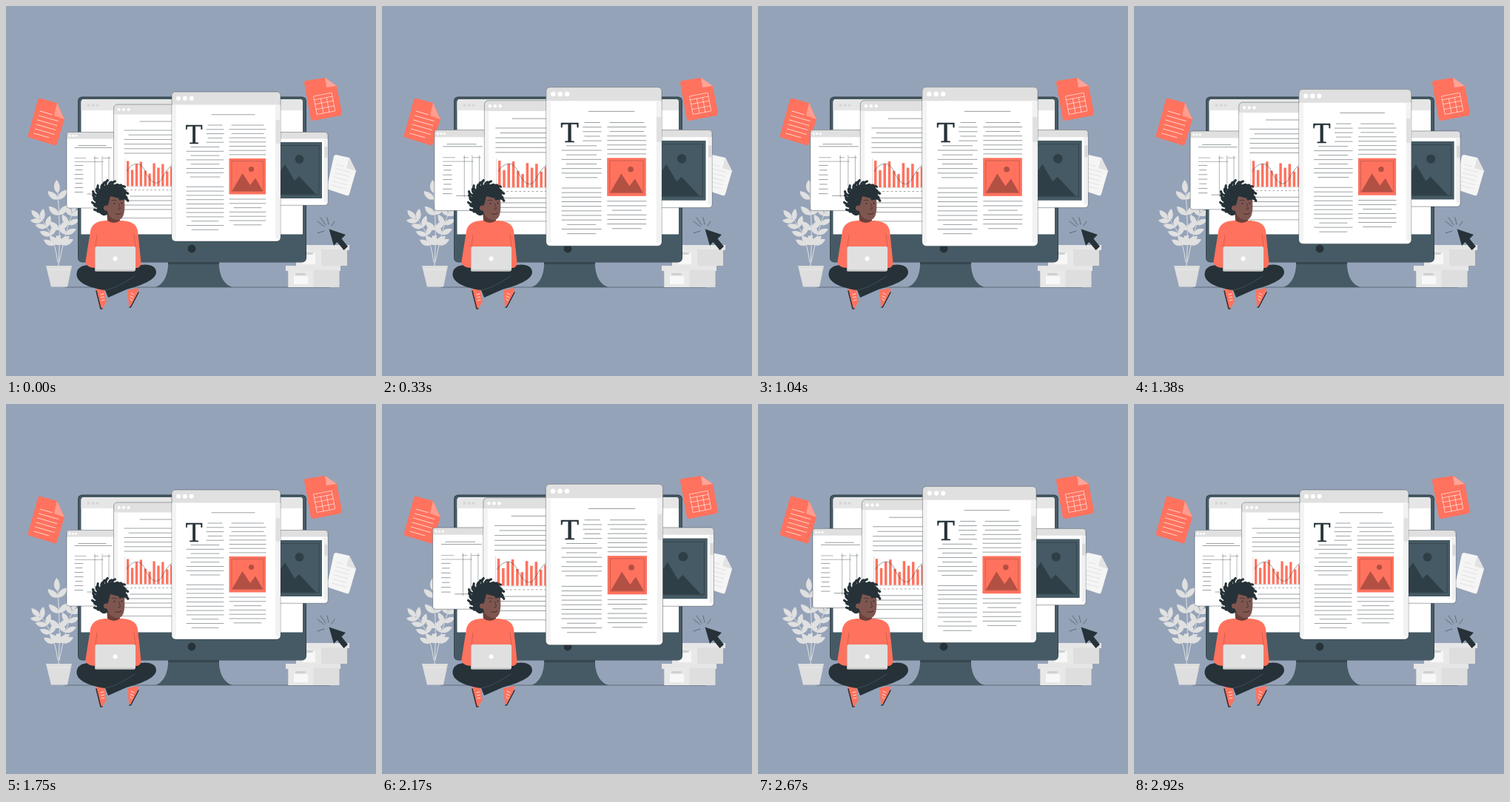
An HTML page that plays this animation: 500x500 px, repeating every 2.96 s.

```html
<!DOCTYPE html>
<html lang="en">
<head>
<meta charset="utf-8">
<title>Documents</title>
<style>
html, body { margin: 0; width: 100%; height: 100%; overflow: hidden; background: #95a3b9; }
svg { display: block; width: 100vw; height: 100vh; }
</style>
</head>
<body>
<svg id="stage" viewBox="0 0 500 500"></svg>
<script>
const INK = '#263238', SLATE = '#455a64', CORAL = '#ff725e', GREY = '#e0e0e0', SKIN = '#7f564f';

const path = (d, fill, extra = '') => `<path d="${d}" fill="${fill}" ${extra}/>`;
const stroke = (d, color = INK, width = 0.6) =>
  path(d, 'none', `stroke="${color}" stroke-width="${width}" stroke-linecap="round" stroke-linejoin="round"`);
const rect = (x, y, w, h, fill, r = 0, extra = '') =>
  `<rect x="${x}" y="${y}" width="${w}" height="${h}" rx="${r}" fill="${fill}" ${extra}/>`;
const circle = (x, y, r, fill) => `<circle cx="${x}" cy="${y}" r="${r}" fill="${fill}"/>`;
const range = (n, fn) => Array.from({ length: n }, (_, i) => fn(i)).join('');
const dots = (x, y, r, gap, fill = '#fff') => range(3, i => circle(x + i * gap, y, r, fill));

// Evenly spaced horizontal rules; "short" lists the inset rows.
const rules = (x1, x2, y, step, n, short = [], inset = 6) => stroke(range(n, i => {
  const d = short.includes(i) ? inset : 0;
  return `M${x1 + d} ${(y + i * step).toFixed(1)}H${x2 - d}`;
}), INK, 0.45);

function panel(x, y, w, h, bar, r) {
  return rect(x, y, w, h, '#fff', r) +
    path(`M${x} ${y + bar}V${y + r}q0 ${-r} ${r} ${-r}H${x + w - r}q${r} 0 ${r} ${r}V${y + bar}z`, GREY) +
    rect(x, y, w, h, 'none', r, `stroke="${INK}" stroke-width=".4"`);
}

function monitor() {
  return path('M219 344H288C287 361 293 376 306 380H202C214 376 220 361 219 344z', SLATE) +
    path('M219 344H288V349H219z', '#37474f') +
    rect(97, 122.5, 309, 224, '#37474f', 6) + rect(98, 124, 307, 222, SLATE, 5) +
    path('M101.5 308.5V130q0-4 4-4H397q4 0 4 4V308.5z', '#fff') +
    path('M101.5 141V130q0-4 4-4H397q4 0 4 4V141z', '#e6e6e6') +
    dots(111.5, 134, 2.1, 6, '#d6d6d6') + circle(251, 328, 5.4, INK);
}

function leaf(x, y, angle, size) {
  return path(`M0 0C${size * .25} ${-size * .34} ${size * .7} ${-size * .32} ${size} 0C${size * .65} ${size * .24} ${size * .25} ${size * .26} 0 0z`,
    GREY, `transform="translate(${x.toFixed(1)} ${y.toFixed(1)}) rotate(${angle.toFixed(1)})"`);
}

// A quadratic stem with leaf pairs along its outer part and one leaf at the tip.
function branch(x0, y0, cx, cy, x1, y1, pairs, size) {
  const at = t => {
    const u = 1 - t;
    return [
      u * u * x0 + 2 * u * t * cx + t * t * x1,
      u * u * y0 + 2 * u * t * cy + t * t * y1,
      Math.atan2(u * (cy - y0) + t * (y1 - cy), u * (cx - x0) + t * (x1 - cx)) * 180 / Math.PI
    ];
  };
  const leaves = range(pairs, i => {
    const [x, y, angle] = at(.3 + .62 * i / (pairs - 1));
    return leaf(x, y, angle - 48, size) + leaf(x, y, angle + 48, size);
  });
  return stroke(`M${x0} ${y0}Q${cx} ${cy} ${x1} ${y1}`, GREY, 1) + leaves + leaf(...at(1), size);
}

function plant() {
  return branch(71, 351, 74, 305, 70, 253, 4, 18) +
    branch(70, 346, 64, 304, 46, 287, 4, 16) +
    branch(72, 346, 80, 306, 90, 279, 4, 16) +
    path('M54 351H89L83 379.5H61z', '#dedede') + stroke('M58 356H85', '#efefef', .8);
}

function flyingPages() {
  const redLines = range(6, i => {
    const x = 46 - i * 1.65, y = 142 + i * 6;
    const w = i === 0 ? 16 : i === 5 ? 20 : 26;
    return `M${x} ${y}l${w} ${w * .29}`;
  });
  const grid = rect(0, 0, 25, 25, 'none', 0, 'stroke="#fff" stroke-width=".55"') +
    stroke('M0 5H25M0 11H25M0 18H25M9 5V25M17 5V25', '#fff', .55);
  return path('M47 125Q44 124 43 127L30 174Q29 177 32 178L65 188Q68 189 69 186L79 153L69 131z', CORAL) +
    path('M69 131L65 148L79 153z', '#ff9c8e') + stroke(redLines, '#fff', .7) +
    path('M405 101L431 97L447 108L454 145Q454 147 452 148L415 155Q412 155 412 153L403 104Q403 101 405 101z', CORAL) +
    path('M431 97L433 110L447 108z', '#ffa497') +
    `<g transform="translate(415.5 122) rotate(-11)">${grid}</g>` +
    path('M446 201L464 205L473 223L464 254Q463 257 460 256L436 248Q433 247 434 244L443 203Q444 201 446 201z', '#f5f5f5') +
    path('M464 205L460 219L473 223z', '#e2e2e2') +
    stroke(range(6, i => `M${447 - i * 1.4} ${214 + i * 5.6}l${i ? 19 : 9} ${i ? 5.2 : 2.5}`), '#dcdcdc', .8);
}

function boxes() {
  return rect(404, 323, 60, 7, '#e6e6e6') + rect(392, 329, 69, 22, '#dedede') +
    rect(392, 329, 34, 22, '#e8e8e8') + rect(400, 334, 18, 15, '#f7f7f7') + rect(403, 333, 12, 3, '#d0d0d0', 1.5) +
    rect(378, 351, 74, 7, '#e6e6e6') + rect(381.5, 357, 69, 23, '#dedede') +
    rect(381.5, 357, 34, 23, '#e8e8e8') + rect(389, 365, 19, 11, '#f8f8f8') + rect(391, 361, 14, 3, '#cfcfcf', 1.5);
}

function pointer() {
  return stroke('M421 291L430 298M425 286L432 296M434 286L436 295M444 291L440 297M421 307L430 304', INK, .5) +
    path('M436.5 301.5L459 309L453.5 314.5L462 325L456.5 330L447.5 319L443 324z', INK);
}

function tablePage() {
  return panel(82, 170.5, 100, 102.5, 9, 3) + dots(86.3, 175.2, 1.5, 4.2) +
    rules(98, 135, 188.5, 3, 1) + rules(93, 143, 191.5, 3, 1) +
    stroke('M93 205.5H108M119 205.5H125M131 205.5H141M93 210.5H131M120 203V256M130 203V256M139 203V256', INK, .35) +
    rules(93, 104, 215.5, 6, 7, [1, 4], 1) + rules(110, 131, 254, 5, 1);
}

function chartPage() {
  const heights = [34, 22, 30, 33, 21, 17, 31, 25, 30, 20, 26];
  return panel(145.5, 133, 150, 153.5, 13.5, 5) + rect(146, 146.5, 5, 139, '#f3f3f3') +
    dots(152.6, 140, 2.1, 6.5) +
    rules(181, 240, 156, 6, 1) + rules(160, 240, 168, 6.2, 6, [1], 6) +
    range(heights.length, i => rect(163 + i * 5.9, 243.5 - heights[i], 3.3, heights[i], CORAL)) +
    stroke('M161 207V244H240', '#9aa1a4', .35) +
    stroke('M163 223C171 211 181 210 187 221C194 237 202 243 208 237C213 231 217 219 226 214', INK, .45) +
    stroke(range(13, i => `M${163 + i * 5.4} 248.5h2`), '#777', .6) +
    rules(160, 240, 257, 6, 4, [0], 8);
}

function picturePage() {
  return panel(300, 170.5, 135, 98.8, 9, 4) + rect(429.5, 180, 5, 85, '#f0f0f0') +
    rect(430.5, 190, 4, 15, '#d8d8d8') + rect(320, 184, 107, 76, SLATE) +
    stroke('M320 188.5H423V255H320', INK, .5) +
    path('M350 254.5L377 214L390 236L396 230L419 254.5z', '#2f3f47') + circle(396.5, 207, 5.9, '#2f3f47');
}

function articlePage() {
  return panel(224, 116, 147, 202, 17.5, 5) + rect(224.5, 134, 5.5, 180, '#f4f4f4', 1) +
    rect(364, 134, 6.5, 180, '#f2f2f2', 1) + rect(364.5, 154, 6.3, 32, GREY, 1) +
    dots(233, 124.8, 3, 8.8) + rules(278, 336, 146.8, 6, 1) +
    `<text x="254" y="185.8" text-anchor="middle" font-family="'Liberation Serif', 'Noto Serif', serif" font-size="38" fill="${INK}" stroke="${INK}" stroke-width=".4">T</text>` +
    rules(271, 294, 161, 5.8, 5, [0, 3], 2) +
    rules(244, 294, 190.5, 5.8, 7, [0, 2, 4], 6) +
    rules(244, 294, 244.3, 5.8, 11, [8, 10], 7) + rules(249, 289, 231, 6, 1) +
    rules(302, 351, 161, 5.7, 8, [0, 2], 3) +
    rect(301.5, 206, 49.5, 48.5, CORAL) + rect(305, 209.5, 42.5, 41, 'none', 0, 'stroke="#a24b40" stroke-width=".5"') +
    path('M305.5 250L319.5 226L330 242L337 232.5L347 250z', '#b25043') + circle(331.5, 220.5, 3.6, '#b25043') +
    rules(302, 351, 261, 5.8, 7, [2, 6], 6);
}

// Hooked locks radiate around the crown, leaving the face side open.
function hair() {
  const locks = range(22, i => {
    const angle = 118 + i * 11.5, reach = 22 + (i * 7 % 5) * .9;
    return `<g transform="translate(141 261) rotate(${angle})">${stroke(`M13 0Q${reach - 2} -3 ${reach} 2.5`, INK, 3.2)}</g>`;
  });
  return path('M127 280C116 266 120 242 142 241C158 241 166 249 161 259C154 262 147 258 141 257C139 264 139 269 135 273L138 281C134 284 130 284 127 280z', INK) + locks;
}

function person() {
  const shoeLeft = path('M121 383L132 380L136 399L130 409.5L126.5 408z', CORAL) +
    stroke('M122 385L128 409L130 409', INK, 1.5) + stroke('M128 390l4-1M128.5 394l4-1M129 398l4-1', '#fff', .8);
  const shoeRight = path('M164 384L179 381L178.5 389L169 407L166 405z', CORAL) +
    stroke('M179 387L168.5 407L167 407', INK, 1.5) + stroke('M169 388l4 2M168 392l4 2M168 396l3 2', '#fff', .8);
  return shoeLeft + shoeRight +
    path('M96 359C99 348 116 349 126 353L175 352C190 347 203 350 203 360C202 371 181 378 163 383L138 394L134 384C112 381 92 373 96 359z', INK) +
    stroke('M134 384C147 382 161 373 174 365', '#52616a', .6) +
    path('M134 290C122 291 116 295 114 304L107.5 345Q108 354 122 354H177Q184 353 182 342L178 304C176 294 169 291 157 290z', CORAL) +
    stroke('M123 310L121 325M173 309L175 325', '#bd4f43', .6) +
    path('M136 274L137 290Q146 296 154 290L152 280z', '#6a4039') +
    path('M136 255C142 248 159 250 160 262C161 276 160 289 151 289C143 289 137 283 136 274z', SKIN) +
    hair() + circle(135.5, 273, 3.6, SKIN) +
    circle(146.5, 267, 1, INK) + circle(156.5, 266.5, 1, INK) +
    stroke('M143 263q3-2 6 0M154 262q3-2 5 0M152.5 267l2 7l-3 1', INK, .7) + stroke('M148 281q4 2 8-1', '#3c2522', .8) +
    rect(120, 325, 55, 33.5, '#bdbdbd', 2.5) + rect(121, 325, 54, 32.5, GREY, 2.5) +
    rect(120, 356.5, 54, 2, '#c8c8c8', 1) + circle(147.5, 341.5, 3, '#fff');
}

document.getElementById('stage').innerHTML =
  rect(0, 0, 500, 500, '#95a3b9') + stroke('M80 380H437', INK, .5) +
  plant() + boxes() + monitor() + flyingPages() +
  `<g id="pages">${picturePage()}${tablePage()}${chartPage()}${articlePage()}</g>` +
  pointer() + person();

const LOOP = 2960, FPS = 24, GROWTH = 0.106;
// [frame, amount]: a quick swell and slow release, then an even pulse.
const keys = [[0, 0], [13.5, 1], [42, 0], [56, 1], [70, 0], [72, 0]];
const pages = document.getElementById('pages');

function amountAt(frame) {
  const i = keys.findIndex(([f]) => f > frame);
  const [f0, a0] = keys[i - 1], [f1, a1] = keys[i];
  return a0 + (a1 - a0) * (frame - f0) / (f1 - f0);
}

function render(ms) {
  const frame = Math.floor((ms % LOOP + 5) * FPS / 1000);
  const scale = 1 + GROWTH * amountAt(frame);
  pages.setAttribute('transform', `translate(259 217) scale(${scale.toFixed(4)}) translate(-259 -217)`);
}

let start;
function tick(now) {
  start ??= now;
  render(now - start);
  requestAnimationFrame(tick);
}
render(0);
requestAnimationFrame(tick);
</script>
</body>
</html>
```
